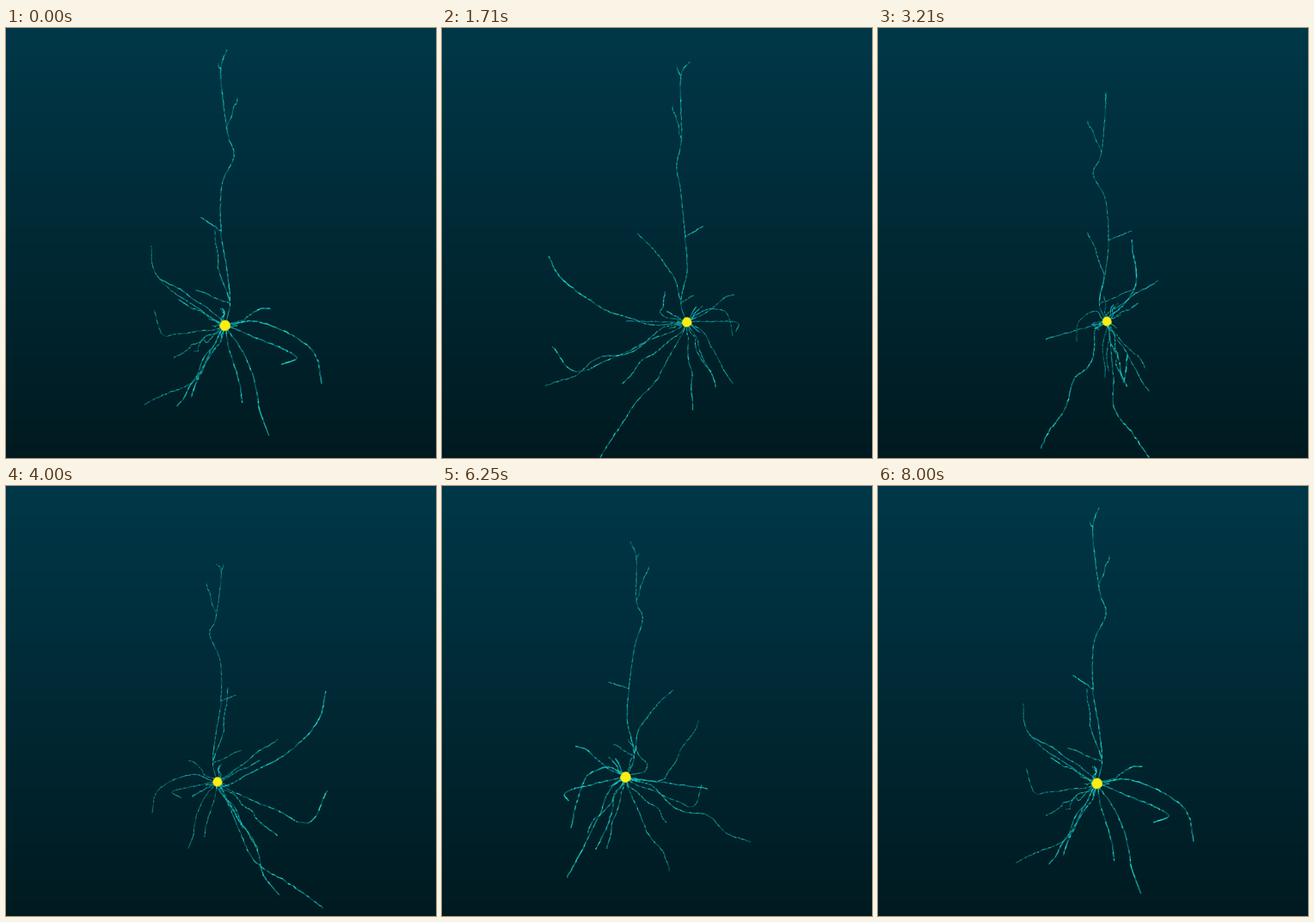
These frames come from a looping animation (500x500 px, 8.04 s). A matplotlib script:

```python
import numpy as np
import matplotlib.pyplot as plt
from matplotlib.animation import FuncAnimation
from matplotlib.collections import LineCollection
from matplotlib.patches import Polygon

SIZE, MID, DIST = 500, 250, 400
FRAMES, INTERVAL = 201, 40
rng = np.random.default_rng(7)


def elevation(turn):
    """The camera bobs a little while it orbits."""
    return np.radians(6 - 11 * np.sin(turn + np.radians(28)))


def unproject(x, y, z):
    """Stage position at turn 0 plus depth -> point in space."""
    s, c = np.sin(elevation(0)), np.cos(elevation(0))
    u, v = x - MID, MID - y
    h = (v * (DIST - z * c) / DIST - z * s) / (c - v * s / DIST)
    return np.array([u * (DIST + h * s - z * c) / DIST, h, z])


def project(points, turn):
    """Space -> stage x, y and perspective scale."""
    px, h, pz = points.T
    e = elevation(turn)
    x = px * np.cos(turn) + pz * np.sin(turn)
    near = pz * np.cos(turn) - px * np.sin(turn)
    scale = DIST / (DIST + h * np.sin(e) - near * np.cos(e))
    up = h * np.cos(e) + near * np.sin(e)
    sway = 2.5 * (1 - np.cos(turn)) + 3 * np.sin(turn)
    return MID + x * scale, MID - up * scale + sway, scale


def smooth(p, step=2.6):
    """Catmull-Rom curve through the points, sampled evenly."""
    p = np.vstack([2 * p[0] - p[1], p, 2 * p[-1] - p[-2]])
    out = []
    for a, b, c, d in zip(p, p[1:], p[2:], p[3:]):
        n = max(2, int(np.linalg.norm(c - b) / step))
        t = np.arange(n)[:, None] / n
        out.append(0.5 * (2 * b + (c - a) * t
                          + (2 * a - 5 * b + 4 * c - d) * t ** 2
                          + (3 * b - a - 3 * c + d) * t ** 3))
    return np.vstack(out + [p[-2:-1]])


neurites = []


def grow(*stops, meander=0.018):
    """Run a neurite through the stops with a seeded wander between its ends."""
    curve = smooth(np.array([unproject(*s) for s in stops]))
    t = np.linspace(0, 1, len(curve))[:, None]
    reach = np.linalg.norm(curve[-1] - curve[0])
    for k in range(2, 7):
        curve += meander * reach * np.sin(np.pi * k * t) * rng.normal(0, 1 / k, 3)
    neurites.append(curve + rng.normal(0, 0.25, curve.shape))


SOMA = (254.7, 346, 35)
LOW, FORK, TUFT, CROWN = (261, 320, 27), (250, 236, 33), (257, 118, 27), (250, 50, 27)

# apical trunk and its side twigs
grow(SOMA, LOW, (257, 280, 35), FORK, (251, 182, 27), (265, 150, 20),
     TUFT, CROWN, (257, 25, 36), meander=0.003)
grow(CROWN, (246, 41, 23))
grow(TUFT, (269, 80, 14), meander=0.04)
grow(FORK, (227, 220, 56))
grow(LOW, (248, 280, 18), (243, 235, -22))
grow(LOW, (220, 305, 48))

# dendrites that bend on their way out
grow(SOMA, (236, 335, -12), (176, 289, -52), (169, 253, -81))
grow(SOMA, (238, 328, 10), (176, 289, 26))
grow(SOMA, (186, 357, -56), (172, 328, -82))
grow(SOMA, (216, 412, -7), (160, 439, -35))
grow(SOMA, (280, 385, 58), (295, 440, 78), (306, 474, 88))
grow(SOMA, (332, 378, 88), (320, 391, 90))
grow(SOMA, (302, 343, 60), (353, 373, 80), (367, 413, 85))

# dendrites that run straight to their tips
for tip in ((200, 316, 22), (195, 383, -23), (218, 376, -125), (199, 440, 50),
            (215, 430, 72), (275, 436, 64), (307, 326, 88)):
    grow(SOMA, tip, meander=0.035)
grow(SOMA, (275, 340, -48), meander=0.005)

# short stubs around the cell body
for angle in rng.uniform(0, 2 * np.pi, 6):
    r = rng.uniform(14, 30)
    grow(SOMA, (SOMA[0] + r * np.cos(angle), SOMA[1] + r * np.sin(angle),
                SOMA[2] + rng.uniform(-20, 20)), meander=0.06)

# every segment keeps its own glint
glint = rng.beta(1.3, 1.1, sum(len(n) - 1 for n in neurites))
DIM, LIT = np.array([0.03, 0.5, 0.5]), np.array([0.12, 0.9, 0.86])
rgba = np.ones((len(glint), 4))
rgba[:, :3] = DIM + glint[:, None] * (LIT - DIM)

fig = plt.figure(figsize=(5, 5), dpi=100)
ax = fig.add_axes([0, 0, 1, 1])
ax.axis("off")

sky = np.linspace((0, 55.5, 72), (0, 25.5, 32), SIZE)
ax.imshow(np.round(sky)[:, None].astype(np.uint8), aspect="auto",
          extent=(0, SIZE, SIZE, 0), interpolation="nearest")
ax.set_xlim(0, SIZE)
ax.set_ylim(SIZE, 0)

lines = LineCollection([], capstyle="butt", zorder=2)
ax.add_collection(lines)

angles = np.linspace(0, 2 * np.pi, 24, endpoint=False)
rim = np.column_stack([np.cos(angles), np.sin(angles)])
rim *= 1 + rng.uniform(-0.05, 0.05, (24, 1))
body = Polygon(rim, fc="#fbee12", ec="#d8d820", lw=0.4, zorder=3)
ax.add_patch(body)
soma = unproject(*SOMA)[None]


def draw(i):
    turn = 2 * np.pi * i / (FRAMES - 1)
    segs, scales = [], []
    for curve in neurites:
        x, y, s = project(curve, turn)
        xy = np.column_stack([x, y])
        segs.append(np.stack([xy[:-1], xy[1:]], axis=1))
        scales.append(s[:-1])
    scale = np.concatenate(scales)
    depth = np.clip(0.85 + 0.8 * (scale - 1), 0.5, 1)
    rgba[:, 3] = depth * (0.4 + 0.6 * glint)
    lines.set_segments(np.concatenate(segs))
    lines.set_color(rgba)
    lines.set_linewidth(0.85 * np.clip(scale, 0.8, 1.25))

    x, y, s = project(soma, turn)
    body.set_xy(rim * 5.5 * s[0] + [x[0], y[0]])
    return lines, body


anim = FuncAnimation(fig, draw, frames=FRAMES, interval=INTERVAL,
                     repeat=True, repeat_delay=0, blit=False)
plt.show()
```
